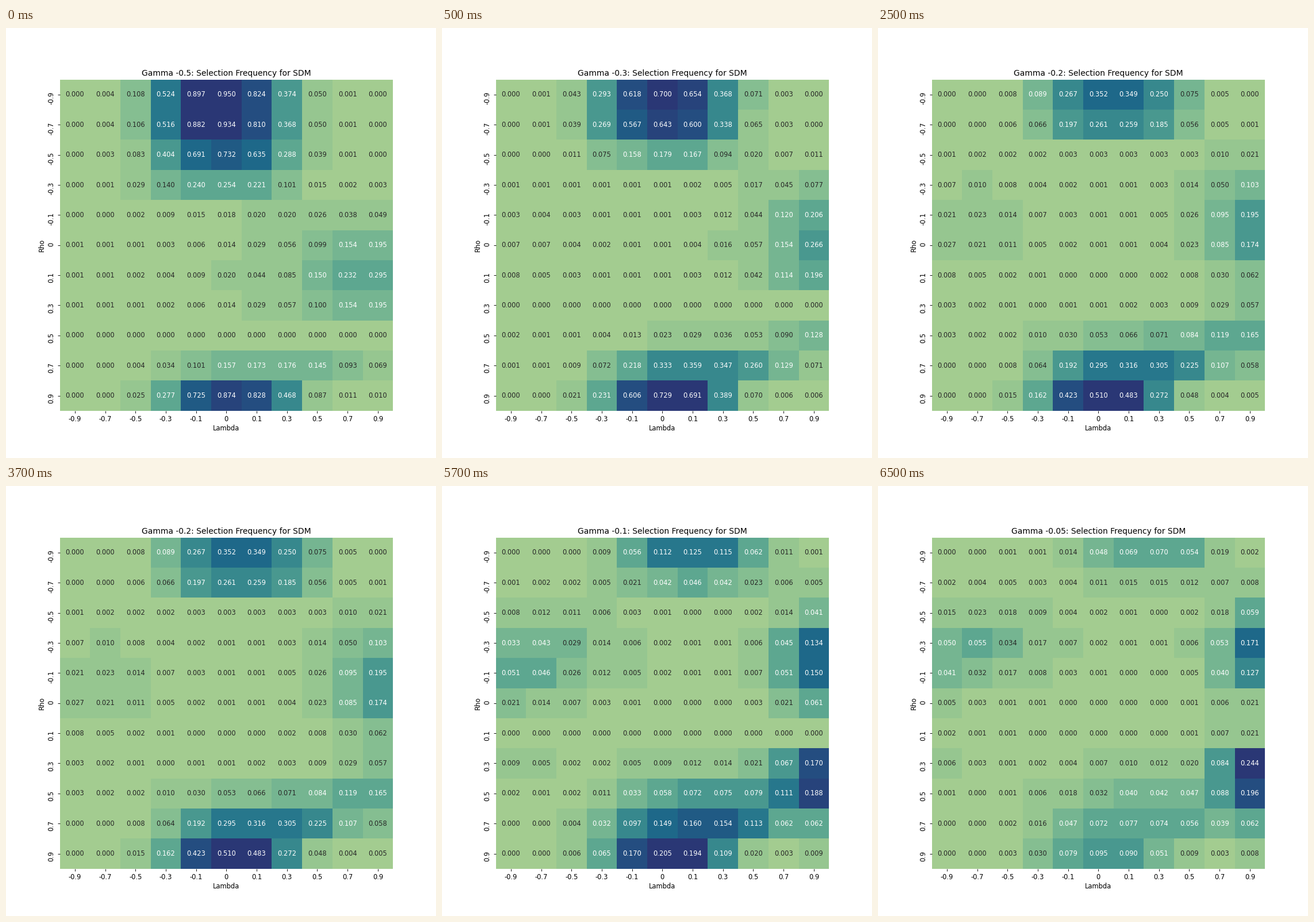
A matplotlib script for the animation above (8 s loop, 748 px wide and 748 px high).

```python
import numpy as np
import matplotlib.pyplot as plt
from matplotlib.animation import FuncAnimation
from matplotlib.colors import BoundaryNorm, LinearSegmentedColormap, ListedColormap

plt.rcParams["font.family"] = "DejaVu Sans"

LEVELS = ["-0.9", "-0.7", "-0.5", "-0.3", "-0.1", "0", "0.1", "0.3", "0.5", "0.7", "0.9"]
SIZE = len(LEVELS)
LAST = SIZE - 1
RHO = np.array(LEVELS, float)[:, None]
ROWS = np.arange(SIZE)[:, None]
COLS = np.arange(SIZE)[None, :]

# Each gamma shapes four hills, one per side of the grid:
# top (height, row spread, column), bottom (height, row spread),
# right (height, row, row spread, column spread), left (height, row).
SCENES = {
    "-0.5": dict(top=(.95, 2.8, 4.85), bottom=(.89, .9), right=(.31, 6.7, 2.2, 2.6), left=(.001, 6)),
    "-0.3": dict(top=(.70, 1.85, 5.1), bottom=(.73, 1.2), right=(.31, 5.9, 2.6, 1.5), left=(.012, 6)),
    "-0.2": dict(top=(.355, 1.35, 5.45), bottom=(.51, 1.45), right=(.28, 5.7, 2.7, 1.25), left=(.045, 5.3)),
    "-0.1": dict(top=(.125, 1.0, 6.05), bottom=(.205, 2.0), right=(.28, 5.6, 2.9, .95), left=(.10, 4.7)),
    "-0.05": dict(top=(.07, .9, 6.6), bottom=(.095, 2.2), right=(.34, 5.5, 2.9, .9), left=(.10, 4.3)),
}
GAMMAS = list(SCENES)


def hill(height, row, col, row_spread, col_spread, row_power, col_power, lean=0, growth=0):
    """Smooth hill whose centre leans, and whose width grows, with each row upwards."""
    rise = row - ROWS
    across = np.abs(COLS - col - lean * rise) / (col_spread + growth * rise)
    along = np.abs(rise) / row_spread
    return height * np.exp(-along ** row_power - across ** col_power)


def frequencies(gamma):
    scene = SCENES[gamma]
    height, spread, col = scene["top"]
    total = hill(height, 0, col, spread, 2.2, 4, 3)
    height, spread = scene["bottom"]
    total = total + hill(height, LAST, 5.2, spread, 2.1, 2, 3, lean=.9, growth=.55)
    height, row, spread, reach = scene["right"]
    total = total + hill(height, row, LAST, spread, reach, 3, 1.5)
    height, row = scene["left"]
    total = total + hill(height, row, 0, 1.9, 2, 2, 1.5, lean=.5)
    # The model is never selected where rho cancels gamma.
    return total * (1 - np.exp(-((RHO + float(gamma)) / .2) ** 2))


# Green-to-navy ramp, flattened into bands of one colour each.
RAMP = LinearSegmentedColormap.from_list("ramp", [
    "#a5cd90", "#7dba91", "#59a590", "#40908e", "#287a8c", "#1c6488", "#254b7f", "#2c3172"])
EDGES = np.array([0, .0193, .097, .134, .2185, .325, .43, .535, .64, .74, .803, .878, .922, 1.001])
BANDS = ListedColormap(RAMP((EDGES[:-1] + EDGES[1:]) / 2))
WHITE_TEXT_FROM = 39 / 256

fig, ax = plt.subplots(figsize=(9, 9), dpi=748 / 9, facecolor="white")
mesh = ax.pcolormesh(np.zeros((SIZE, SIZE)), cmap=BANDS, norm=BoundaryNorm(EDGES, BANDS.N))
ax.set(xlim=(0, SIZE), ylim=(SIZE, 0))
ax.set_xlabel("Lambda", labelpad=3)
ax.set_ylabel("Rho", labelpad=3)
ax.spines[:].set_visible(False)
centres = np.arange(SIZE) + 0.5
ax.set_xticks(centres, LEVELS)
ax.set_yticks(centres, LEVELS, rotation="vertical")
title = ax.set_title("")
labels = [ax.text(x, y, "", ha="center", va="center") for y in centres for x in centres]


def update(step):
    # The first scene shows for one step, the later ones for four.
    gamma = GAMMAS[(step + 3) // 4]
    values = frequencies(gamma)
    share = values / values.max()
    mesh.set_array(share)
    title.set_text(f"Gamma {gamma}: Selection Frequency for SDM")
    for label, value, part in zip(labels, values.flat, share.flat):
        label.set_text(f"{value:.3f}")
        label.set_color("white" if part >= WHITE_TEXT_FROM else "0.15")
    return [mesh, title, *labels]


anim = FuncAnimation(fig, update, frames=16, interval=500, repeat=True, repeat_delay=0, blit=False)
plt.show()
```
